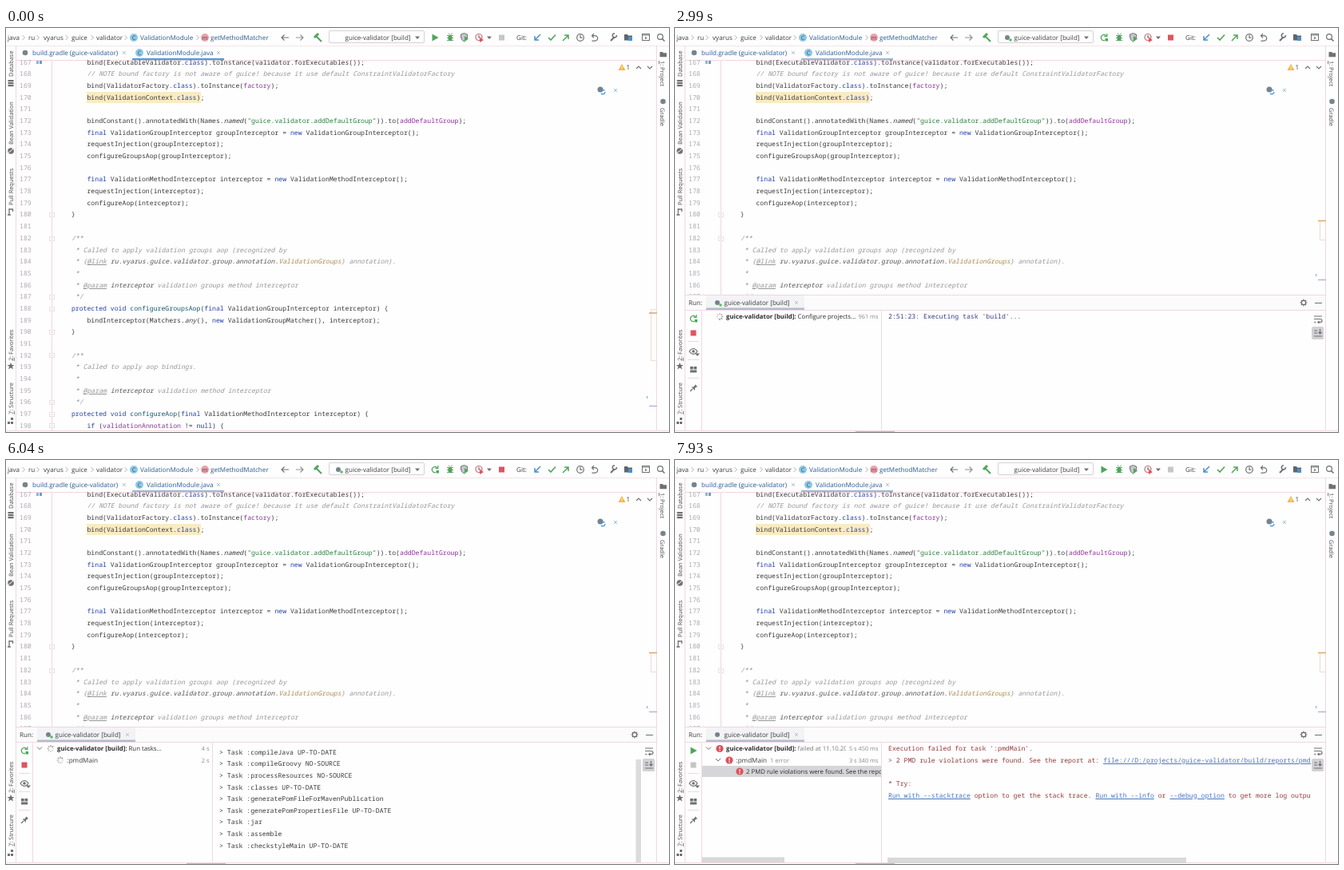
An HTML page for the animation above (8 s loop, 830 by 506 pixels).

```html
<!DOCTYPE html>
<html lang="en">
<head>
<meta charset="utf-8">
<title>Build run in an editor</title>
<style>
html, body { margin: 0; width: 100%; height: 100%; overflow: hidden; background: #fefefe; text-rendering: geometricPrecision; }
svg, div, pre { position: absolute; left: 0; top: 0; margin: 0; }
svg { width: 830px; height: 506px; }
text { font-family: "Open Sans", sans-serif; white-space: pre; }
pre { font: 8.17px/14.68px "Noto Sans Mono", monospace; color: #3a3a3e; }
#editor { top: 40px; width: 806px; height: 464px; overflow: hidden; }
#editor pre { top: -3.5px; left: 62.3px; }
#editor #numbers { left: 17px; color: #aaa8b2; }
#console { left: 259px; top: 354px; width: 537px; height: 151px; overflow: hidden; }
#console pre { left: 8px; line-height: 14.66px; }
#console div { left: 7px; top: 143.5px; width: 374px; height: 7.5px; background: #d2d2d2d8; }
k { color: #2440a8; }
v { color: #8a3398; }
g { color: #2f7d3b; }
m { color: #1b5a70; }
c { color: #969696; font-style: italic; }
d { color: #55555a; }
o { color: #b08a50; }
e { color: #963a3a; }
n { color: #33407e; }
e u { color: #4a76bd; }
</style>
</head>
<body>
<svg id="base"></svg>
<div id="editor"><pre id="numbers"></pre><pre id="code">        bind(ExecutableValidator.<k>class</k>).toInstance(validator.forExecutables());
        <c>// NOTE bound factory is not aware of guice! because it use default ConstraintValidatorFactory</c>
        bind(ValidatorFactory.<k>class</k>).toInstance(<v>factory</v>);
        bind(ValidationContext.<k>class</k>);

        bindConstant().annotatedWith(Names.<i>named</i>(<g>"guice.validator.addDefaultGroup"</g>)).to(<v>addDefaultGroup</v>);
        <k>final</k> ValidationGroupInterceptor groupInterceptor = <k>new</k> ValidationGroupInterceptor();
        requestInjection(groupInterceptor);
        configureGroupsAop(groupInterceptor);

        <k>final</k> ValidationMethodInterceptor interceptor = <k>new</k> ValidationMethodInterceptor();
        requestInjection(interceptor);
        configureAop(interceptor);
    }

    <c>/**
     * Called to apply validation groups aop (recognized by
     * {<u>@link</u> <d>ru.vyarus.guice.validator.group.annotation.</d><o>ValidationGroups</o>} annotation).
     *
     * <u>@param</u> <d>interceptor</d> validation groups method interceptor
     */</c>
    <k>protected void</k> <m>configureGroupsAop</m>(<k>final</k> ValidationGroupInterceptor interceptor) {
        bindInterceptor(Matchers.<i>any</i>(), <k>new</k> ValidationGroupMatcher(), interceptor);
    }

    <c>/**
     * Called to apply aop bindings.
     *
     * <u>@param</u> <d>interceptor</d> validation method interceptor
     */</c>
    <k>protected void</k> <m>configureAop</m>(<k>final</k> ValidationMethodInterceptor interceptor) {
        <k>if</k> (<v>validationAnnotation</v> != <k>null</k>) {</pre></div>
<svg id="live"></svg>
<div id="console"><pre></pre><div id="scrollbar"></div></div>
<script>
const LOOP = 8000, GRAY = '#6e7074', GREEN = '#4fa55b', RED = '#dd5560', BLUE = '#4a90cc', EDGE = '#f0d8df';
const $ = id => document.getElementById(id);

const text = (x, y, s, fill = '#3c3c40', size = 8.1, more = '') =>
  `<text x="${x}" y="${y + 2.9}" font-size="${size}" fill="${fill}" ${more}>${s}</text>`;
const path = (d, stroke = GRAY, width = 1.2, fill = 'none') =>
  `<path d="${d}" stroke="${stroke}" stroke-width="${width}" fill="${fill}"/>`;
const rect = (x, y, w, h, fill, more = '') =>
  `<rect x="${x}" y="${y}" width="${w}" height="${h}" fill="${fill}" ${more}/>`;
const dot = (x, y, r, fill = '#76848c') => `<circle cx="${x}" cy="${y}" r="${r}" fill="${fill}"/>`;
const ring = (x, y, r, color = GRAY) => `<circle cx="${x}" cy="${y}" r="${r}" fill="none" stroke="${color}" stroke-width="1.2"/>`;
const hLine = (x1, x2, y, color = EDGE) => path(`M${x1} ${y}H${x2}`, color, 1);
const vLine = (x, y1, y2, color = EDGE) => path(`M${x} ${y1}V${y2}`, color, 1);
const chevron = (x, y, color = '#a6a6aa') => path(`M${x - 1.5} ${y - 3}l3 3l-3 3`, color, 0.9);
const down = (x, y) => path(`M${x - 3} ${y - 1.5}l3 3l3 -3`, GRAY, 1);
const caret = (x, y) => path(`M${x - 3} ${y - 1.5}h6l-3 3.5z`, 'none', 0, GRAY);
const cross = (x, y, color = '#b4bac0') => path(`M${x - 2} ${y - 2}l4 4m0 -4l-4 4`, color, 0.9);
const badge = (x, y, letter, fill) => dot(x, y, 5, fill) + text(x, y, letter, '#40505c', 7.5, 'text-anchor="middle"');
const play = (x, y) => path(`M${x - 3.5} ${y - 4.5}l8 4.5l-8 4.5z`, 'none', 0, GREEN);
const square = (x, y, fill) => rect(x - 3.5, y - 3.5, 7, 7, fill);
const rerun = (x, y) => path(`M${x + 2.5} ${y - 2.5}a3.6 3.6 0 1 0 -1.5 6M${x + 3.8} ${y - 5}v3.4h-3.4`, GREEN, 1.2) + rect(x + 1.5, y + 1, 3.5, 3.5, GREEN);
const building = (x, y) => dot(x, y, 3) + dot(x + 4, y + 3, 1.8, '#55c060');
const failed = (x, y) => dot(x, y, 4.6, '#d9535c') + path(`M${x} ${y - 2.8}v3.4m0 1v1.3`, '#fff', 1.2);
const sideText = (x, y, angle, s) =>
  `<g transform="translate(${x},${y}) rotate(${angle})">${text(0, 0, s, '#4a4a4e', 7.4)}</g>`;
const underlined = s => `<tspan text-decoration="underline">${s}</tspan>`;
const spinner = (x, y, turn) => Array.from({ length: 8 }, (_, i) =>
  `<path d="M0 -2.2V-4.4" stroke="${GRAY}" stroke-width="1.1" opacity="${0.25 + 0.75 * ((i - turn + 800) % 8) / 7}"
    transform="translate(${x},${y}) rotate(${i * 45})"/>`).join('');
const rowY = n => 43.4 + (n - 167) * 14.68;

function toolbar() {
  const crumbs = [[2, 'java', 22], [28, 'ru', 40], [47, 'vyarus', 76], [82, 'guice', 108], [113, 'validator', 150]];
  return crumbs.map(([x, s, next]) => text(x, 12, s) + chevron(next, 12)).join('')
    + badge(160, 12, 'C', '#8cc8e8') + text(168, 12, 'ValidationModule', '#285a94') + chevron(240, 12)
    + badge(249, 12, 'm', '#f0a0aa') + text(256, 12, 'getMethodMatcher', '#285a94')
    + path('M354 12h-9m3.5 -3.5l-3.5 3.5l3.5 3.5') + path('M363 12h9m-3.5 -3.5l3.5 3.5l-3.5 3.5', '#909296')
    + path('M388 10l7 7', GREEN, 2) + path('M386 12l5 -5', GREEN, 3)
    + rect(404.5, 3.5, 119, 15, '#fff', 'stroke="#dccfd4" rx="1.5"') + text(424.5, 12, 'guice-validator [build]') + caret(515, 12)
    + `<ellipse cx="556" cy="12.5" rx="2.6" ry="3.8" fill="${GREEN}"/>` + path('M552 9.5h8m-8 3h8m-8 3h8m-6 -9l1.5 2m3 -2l-1.5 2', GREEN, 0.9)
    + path('M569.5 8l4 -1.5l4 1.5v3q0 4 -4 6q-4 -2 -4 -6z', GRAY, 1, '#c4c7ca') + path('M574 10l5 3.5l-5 3.5z', 'none', 0, GREEN)
    + ring(592, 11.5, 4, '#c9666e') + path('M592 9v3h2.5') + path('M593 12l5 3l-5 3z', 'none', 0, RED) + caret(605, 12)
    + text(639, 12, 'Git:')
    + path('M669 8l-7 7m0 -5v5h5', BLUE, 1.5) + path('M679 12l3 3l6 -6.5', GREEN, 1.7) + path('M697 16l7 -7m-5 0h5v5', GREEN, 1.5)
    + ring(719, 12, 4.3) + path('M719 9v3.2h2.5') + path('M736 7l-2.5 2.7l2.5 2.7m-2.5 -2.7h4a3 3 0 1 1 0 6.4h-4')
    + path('M757 16l4.5 -4.5', GRAY, 2) + path('M764.5 9a2.6 2.6 0 1 1 -2.6 -2.3', GRAY, 1.6)
    + path('M774 8h4l1 1.5h5v6h-10z', 'none', 0, '#5d666e') + rect(779, 11, 5, 5, BLUE)
    + rect(796.5, 7.5, 9, 8, 'none', `stroke="${GRAY}"`) + hLine(796, 806, 9, GRAY) + path('M800 11l3 1.5l-3 1.5z', 'none', 0, GRAY)
    + ring(819, 11, 3.4) + path('M821.5 13.5l3 3', GRAY, 1.6);
}

function sidebars() {
  return sideText(6, 61, -90, 'Database') + [66, 69, 72].map(y => rect(2.5, y - 1, 7, 2.2, GRAY)).join('')
    + sideText(6, 146, -90, 'Bean Validation') + dot(6, 154, 3.8, GRAY) + path('M6 154l3 -3m-3 3l-3 2', '#fff', 1)
    + sideText(6, 222, -90, 'Pull Requests') + path('M4 226v8M4 227h4.5v3M2 234h4', GRAY, 1.3)
    + sideText(6, 417, -90, underlined(2) + ': Favorites')
    + path('M6 419l1.3 3h3.2l-2.5 2l1 3.4l-3 -2l-3 2l1 -3.4l-2.5 -2h3.2z', 'none', 0, GRAY)
    + sideText(6, 484, -90, underlined(7) + ': Structure') + rect(6, 488, 3, 3, GRAY) + rect(2, 493, 3, 3, GRAY) + rect(6, 493, 3, 3, GRAY)
    + path('M818.5 30h3.5l1 1.3h4v5h-8.5z', 'none', 0, GRAY) + sideText(822, 41, 90, underlined(1) + ': Project')
    + dot(822.5, 92, 3.3) + sideText(822, 100, 90, 'Gradle');
}

function editorFrame() {
  const foldRows = [180, 182, 187, 188, 190, 192, 196, 197, 198];
  return hLine(0, 830, 22.5, '#f5e6ea') + hLine(13, 814, 40.5) + vLine(12.5, 22, 504) + vLine(814.5, 22, 504)
    + dot(24, 31, 3.3) + text(33, 31, 'build.gradle (guice-validator)', '#285a94') + cross(148, 31)
    + badge(167, 31, 'C', '#8cc8e8') + text(176, 31, 'ValidationModule.java', '#285a94') + cross(266, 31)
    + vLine(57.5, 41, 504)
    + foldRows.map(n => rect(54.5, Math.round(rowY(n)) - 2.5, 6, 5, '#fefefe', 'stroke="#efdde3"') + hLine(56, 59, Math.round(rowY(n)), '#dccbd1')).join('')
    + rect(38, 41, 3, 4, '#8cb8d8') + rect(42, 41, 3, 4, '#6aa0c8')
    + rect(101, 80, 143, 14, '#fbebc3')
    + path('M771 45l4.5 8h-9z', 'none', 0, '#f0b93a') + path('M771 48v2.5m0 .8v1', '#fff', 0.9) + text(776.5, 49.5, '1')
    + path('M789 51l3 -3l3 3M803 48l3 3l3 -3', GRAY, 1.1)
    + dot(744, 77, 3.5) + path('M744.5 80a3 3 0 0 1 5 -1.5m.5 1.5a3 3 0 0 1 -5 2', BLUE, 1.3) + cross(763, 78, '#8db8d8');
}

function errorStripe(open) {
  const [mark, top, bottom, dash, end] = open ? [241.5, 241.5, 265.5, 310, 315.5] : [357, 352.5, 416.5, 463, 473.5];
  return rect(807.5, top, 7, bottom - top, 'none', 'stroke="#eddcd6"') + rect(805, mark - 0.8, 10, 1.6, '#e3a86c')
    + rect(802, dash - 2, 1.2, 3, '#7fb4d0') + hLine(805, 815, end, '#b79acb');
}

function tree(t) {
  const done = t >= 7500, tasks = t >= 3420, pmdFailed = t >= 7040, turn = Math.round(t / 144);
  const time = (start, now) => now - start < 1000 ? `${Math.floor(now - start)} ms` : `${Math.floor((now - start) / 1000)} s`;
  const right = (y, s) => rect(254 - s.length * 4, y - 6, s.length * 4 + 3, 12, '#fefefe')
    + text(254.5, y, s, '#8a8a8e', 7.4, 'text-anchor="end"');
  const status = done ? '<tspan fill="#77777b">failed at 11.10.2020</tspan>' : tasks ? 'Run tasks...' : 'Configure projects...';
  if (t < 2100) return '';
  let out = (done ? failed(56, 361.5) : spinner(56, 361.5, turn))
    + text(64, 361.5, `<tspan font-weight="bold">guice-validator [build]:</tspan> ${status}`, '#2c2c30', 7.8)
    + right(361.5, done ? '5 s 450 ms' : time(2029, t));
  if (tasks) out += down(42, 361);
  if (t >= 3660) out += (pmdFailed ? failed(68, 376) : spinner(68, 376, turn))
    + text(76.5, 376, ':pmdMain' + (done ? ' <tspan fill="#8a8a8e" dx="2" font-size="7.5">1 error</tspan>' : ''))
    + right(376, pmdFailed ? '3 s 340 ms' : time(3660, t));
  if (done) out += down(54, 375.5) + rect(34, 383, 224, 14, '#d6d6d8') + failed(81, 390)
    + `<svg x="0" y="0" width="258" height="506">${text(89, 390, '2 PMD rule violations were found. See the report', '#2c2c30', 7.8)}</svg>`
    + rect(34, 497.5, 103, 7, '#d8d8d8');
  return out;
}

function runPanel(t) {
  const done = t >= 7500;
  return rect(13, 334, 801, 170, '#fefefe') + rect(13, 334, 801, 19, '#fbfbfb') + rect(39, 335, 123, 17, '#f3f3f5')
    + hLine(13, 814, 334.5) + hLine(13, 814, 353.5) + rect(39, 350.5, 123, 2.5, '#b3bccb')
    + text(17, 344, 'Run:') + (done ? dot(53, 344, 3) : building(53, 344)) + text(61.5, 344, 'guice-validator [build]') + cross(152, 344)
    + ring(787, 344, 2.7) + path('M787 339.5v2m0 5v2m-4.5 -4.5h2m5 0h2m-7.7 -3.2l1.4 1.4m3.6 3.6l1.4 1.4m0 -6.4l-1.4 1.4m-3.6 3.6l-1.4 1.4') + hLine(801, 810, 344.5, GRAY)
    + vLine(33.5, 354, 504) + vLine(258.5, 354, 504)
    + (done ? play(23, 364) : rerun(23, 364)) + square(23, 382, done ? '#c4c4c6' : RED)
    + [392.5, 415.5, 438.5].map(y => hLine(16, 30, y)).join('')
    + path('M18 405q5 -7 10 0q-5 7 -10 0z') + dot(23, 405, 1.8, GRAY) + caret(28, 409)
    + rect(19, 424, 3.7, 3.5, GRAY) + rect(23.5, 424, 3.7, 3.5, GRAY) + rect(19, 428.5, 8.2, 3, GRAY)
    + path('M19 455l3 -3', GRAY, 1.2) + path('M20.5 449.5l3 0l2 -3l2.5 2.5l-3 2l0 3z', 'none', 0, GRAY)
    + path('M800 361h10M800 364.5h8a2 2 0 0 1 0 4h-3m1.5 -1.7l-1.7 1.7l1.7 1.7M800 368.5h2.5')
    + rect(797, 374, 15, 16, '#d2d2d5', 'rx="1.5"') + path('M800 379h4M800 382h4M800 386h10M807.5 377v6m-2 -2l2 2l2 -2')
    + (t >= 3600 && t < 7040 ? rect(788.5, 375, 6.5, 129, '#dcdcdc') : t >= 7040 && t < 7180 ? rect(788.5, 427, 6.5, 37, '#d8d8d8') : '')
    + tree(t) + rect(226, 504.5, 49, 1.5, '#bdbdc0');
}

const taskNames = ['compileJava UP-TO-DATE', 'compileGroovy NO-SOURCE', 'processResources NO-SOURCE', 'classes UP-TO-DATE',
  'generatePomFileForMavenPublication', 'generatePomPropertiesFile UP-TO-DATE', 'jar', 'assemble', 'checkstyleMain UP-TO-DATE'];
const violations = `<e>  Use equals() to compare object references.
  <u>https://pmd.github.io/pmd-6.23.0/pmd_rules_java_errorprone.html#compareobjectswithequals</u>

[Best Practices | UseVarargs] ru.vyarus.guice.validator.group.(<u>ValidationContext.java:68</u>)
  Consider using varargs for methods or constructors which take an array the last parameter.
  <u>https://pmd.github.io/pmd-6.23.0/pmd_rules_java_bestpractices.html#usevarargs</u>


FAILURE: Build failed with an exception.

* What went wrong:</e>`;
const failure = `<e>Execution failed for task ':pmdMain'.
&gt; 2 PMD rule violations were found. See the report at: <u>file:///D:/projects/guice-validator/build/reports/pmd/main.html</u>

* Try:
<u>Run with --stacktrace</u> option to get the stack trace. <u>Run with --info</u> or <u>--debug option</u> to get more log output.</e>`;

// Returns the console markup and the centre of its first line.
function consoleView(t) {
  if (t < 2100) return ['', 362];
  if (t >= 7180) return [failure, 362.5];
  if (t >= 7040) return [violations, 359.5];
  const shown = Math.max(0, Math.min(9, Math.floor((t - 3400) / 45)));
  const lines = ["<n>2:51:23: Executing task 'build'...</n>", '', '', ...taskNames.slice(0, shown).map(s => '&gt; Task :' + s), ''];
  return [lines.join('\n'), lines.length > 10 ? 498.8 - (lines.length - 1) * 14.66 : 362];
}

function pointer(t) {
  if (t < 710 || t >= 1950) return '';
  const step = Math.round((t - 710) / 140), far = Math.max(0, 1 - step / 6) ** 2;
  const x = 525 + 300 * far + (step > 6 ? 6 : 0), y = 5 + 15 * far + (step > 6 ? 3 : 0);
  return (x < 785 && t < 1820 ? rect(x - 4, 20, 789 - x, 11, '#f8f8f8') : '')
    + path(`M${x} ${y}v11l2.6 -2.4l1.8 4l1.8 -.8l-1.8 -3.9h3.6z`, '#333', 0.8, '#fff');
}

function live(t) {
  const running = t >= 1820 && t < 7930, open = t >= 1950;
  return rect(158, 37.8, 115, 2.4, open ? '#a3b9d2' : '#5b9bd6')
    + (running ? building(416, 12) + rerun(537, 12) : play(537, 12)) + square(620.5, 12, running ? RED : '#c6c6c8')
    + errorStripe(open) + (open ? runPanel(t) : '') + hLine(0, 830, 504.5) + pointer(t);
}

// Screen refreshes come in bursts: first time, last time, count.
const bursts = [[0, 0, 1], [710, 1690, 8], [1820, 2860, 8], [2990, 3880, 7], [4040, 5030, 8], [5190, 6190, 8],
  [6310, 7340, 8], [7500, 7500, 1], [7930, 7930, 1]];
function refreshTime(t) {
  const [first, last, count] = bursts.filter(b => t >= b[0]).pop();
  if (count === 1) return first;
  const gap = (last - first) / (count - 1);
  return first + gap * Math.min(count - 1, Math.floor((t + 12 - first) / gap));
}

$('base').innerHTML = toolbar() + sidebars() + editorFrame();
$('numbers').textContent = Array.from({ length: 32 }, (_, i) => 167 + i).join('\n');
const consoleText = document.querySelector('#console pre');
let drawn = -1;
function frame() {
  const t = refreshTime(performance.now() % LOOP);
  if (t !== drawn) {
    drawn = t;
    $('live').innerHTML = live(t);
    const [markup, y] = consoleView(t);
    consoleText.innerHTML = markup;
    consoleText.style.top = `${y - 361.33}px`;
    $('console').style.display = t >= 1950 ? 'block' : 'none';
    $('scrollbar').style.display = t >= 7040 ? 'block' : 'none';
  }
  requestAnimationFrame(frame);
}
frame();
</script>
</body>
</html>
```
